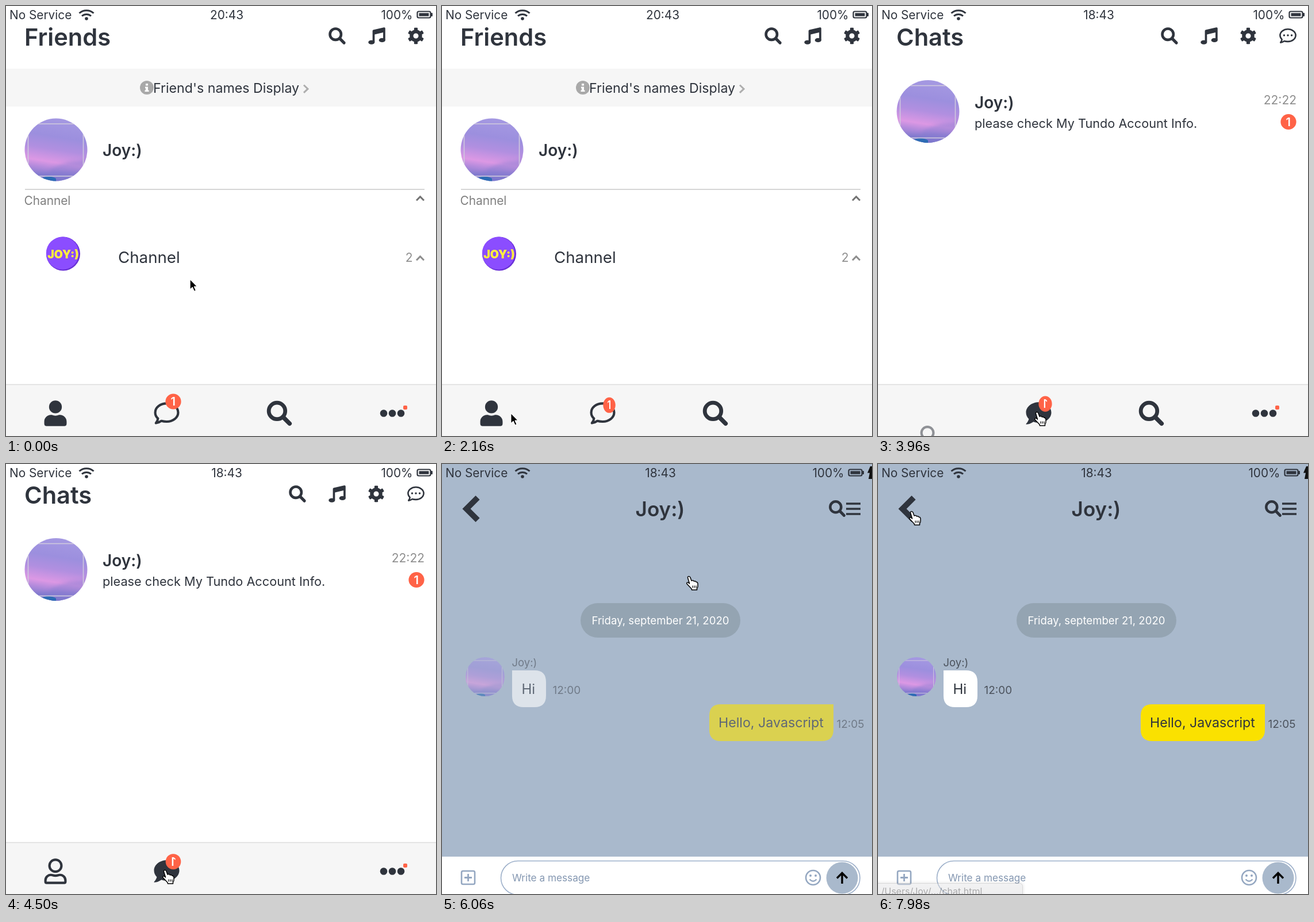
Animation, 748 px wide and 748 px high, one loop 8 s. Source, as an HTML page:

```html
<!DOCTYPE html>
<html lang="en">
<head>
<meta charset="utf-8">
<title>Messenger</title>
<style>
  html, body { margin: 0; width: 100%; height: 100%; overflow: hidden; background: #fff; }
  svg { display: block; width: 100vw; height: 100vh; font-family: Inter, "Noto Sans CJK KR", "Noto Sans CJK", sans-serif; }
  text { white-space: pre; }
</style>
</head>
<body>
<svg id="stage" viewBox="0 0 748 748"></svg>
<script>
const LOOP = 8000, INK = '#2f343d', RED = '#ff6347';
// page changes
const RELOAD = 1060, TO_CHATS = 3740, TO_ROOM = 5760;

const text = (s, x, y, size, o = {}) =>
  `<text x="${x}" y="${y}" font-size="${size}" font-weight="${o.w || 400}" fill="${o.c || INK}" text-anchor="${o.a || 'start'}">${s}</text>`;
const line = (d, c, w, extra = '') =>
  `<path d="${d}" fill="none" stroke="${c}" stroke-width="${w}" ${extra}/>`;
const icon = (id, x, y, size) =>
  `<use href="#${id}" transform="translate(${x} ${y}) scale(${size / 512}) translate(-256 -256)"/>`;
const avatar = (x, y, r) => `<use href="#avatar" transform="translate(${x} ${y}) scale(${r / 54.5})"/>`;
const ring = (d, w = 48) => line(d, INK, w, 'stroke-linejoin="round"');

const bubbleRing = 'M256 56C128 56 24 139 24 240c0 46 20 88 56 120-4 34-20 66-42 94 46-6 84-22 112-44 33 10 69 14 106 14 128 0 232-83 232-184S384 56 256 56z';
const teeth = [0, 60, 120, 180, 240, 300]
  .map(a => `<rect x="202" y="8" width="108" height="100" rx="22" transform="rotate(${a} 256 256)"/>`).join('');

const defs = `<defs>
  <linearGradient id="sky" x1=".58" y1="0" x2=".42" y2="1">
    <stop offset="0" stop-color="#a599e2"/><stop offset=".3" stop-color="#9c8fde"/>
    <stop offset=".5" stop-color="#b18fe0"/><stop offset=".7" stop-color="#dc98e4"/>
    <stop offset=".8" stop-color="#b48bdc"/><stop offset="1" stop-color="#6a74c8"/>
  </linearGradient>
  <linearGradient id="tip" x1="0" y1="0" x2="0" y2="1">
    <stop offset="0" stop-color="#e3e3e5"/><stop offset="1" stop-color="#d2d2d5"/>
  </linearGradient>
  <clipPath id="round"><circle r="54.5"/></clipPath>
  <filter id="soft" x="-20%" y="-60%" width="140%" height="220%"><feGaussianBlur stdDeviation="3"/></filter>
  <g id="avatar" clip-path="url(#round)">
    <rect x="-55" y="-55" width="110" height="110" fill="url(#sky)"/>
    <path d="M-10 34Q18 20 34 20T56 12V56H-10z" fill="#8a80d2" opacity=".5" filter="url(#soft)"/>
    <path d="M-55 46Q-10 36 20 38T56 32V56H-55z" fill="#7a76cc" opacity=".5" filter="url(#soft)"/>
    <path d="M-30 52Q-14 42 0 50V56H-30z" fill="#2d6cb4"/>
    <rect x="-48.5" y="-45" width="96" height="91" fill="none" stroke="#cfc9dd" stroke-width="1.6"/>
  </g>
  <g id="search"><circle cx="208" cy="208" r="168" fill="none" stroke="${INK}" stroke-width="80"/>
    ${line('M350 350L466 466', INK, 88, 'stroke-linecap="round"')}</g>
  <g id="music" fill="${INK}"><ellipse cx="96" cy="448" rx="96" ry="64"/><ellipse cx="416" cy="384" rx="96" ry="64"/>
    <path d="M128 448V102Q128 80 150 72L470 2Q512-8 512 32V384H448V150L192 214V448z"/></g>
  <g id="gear" fill="${INK}"><circle cx="256" cy="256" r="133" fill="none" stroke="${INK}" stroke-width="108"/>${teeth}</g>
  <path id="bubble" fill="${INK}" d="M256 32C115 32 0 125 0 240c0 50 21 95 57 131C45 421 3 466 2 467c-5 6-1 13 6 13 66 0 116-32 141-51 33 12 69 19 107 19 141 0 256-93 256-208S397 32 256 32z"/>
  <g id="bubbleLine">${ring(bubbleRing)}</g>
  <g id="bubbleDots">${ring(bubbleRing, 44)}
    <g fill="${INK}"><circle cx="144" cy="240" r="30"/><circle cx="256" cy="240" r="30"/><circle cx="368" cy="240" r="30"/></g></g>
  <g id="user" fill="${INK}" transform="translate(32)"><circle cx="224" cy="128" r="128"/>
    <path d="M0 464V422C0 348 60 288 134 288H151Q224 320 297 288H314C388 288 448 348 448 422V464Q448 512 400 512H48Q0 512 0 464z"/></g>
  <g id="userLine" transform="translate(32)"><circle cx="224" cy="144" r="120" fill="none" stroke="${INK}" stroke-width="48"/>
    ${ring('M24 464V438C24 377 73 328 134 328C160 328 176 344 224 344S288 328 314 328C375 328 424 377 424 438V464Q424 488 400 488H48Q24 488 24 464z')}</g>
</defs>`;

const statusBar = (time, mid, dx) => text('No Service', 6, 23, 20.8) +
  line('M127.5 12.5a18.5 18.5 0 0 1 25 0M132 17.5a12 12 0 0 1 16 0', INK, 3) +
  `<circle cx="140" cy="22" r="2.8" fill="${INK}"/>` +
  text(time, mid, 23, 20.8, { a: 'middle' }) +
  `<g transform="translate(${dx})">${text('100%', 707.5, 23, 20.8, { a: 'end' })}
    <rect x="715.5" y="9.5" width="23" height="11" rx="2.5" fill="none" stroke="${INK}" stroke-width="2.2"/>
    <rect x="718.5" y="12.3" width="17" height="5.4" fill="${INK}"/><rect x="739" y="12" width="3" height="6" rx="1" fill="${INK}"/></g>`;

const tools = x => icon('search', x, 52, 29.5) + icon('music', x + 69, 52, 29.5) + icon('gear', x + 137, 52, 29.5);
const caretUp = (y, c) => line(`M714 ${y + 3.3}l6.5-6.6 6.5 6.6`, c, 3);
const redOne = `<circle r="13.6" fill="${RED}"/>` + text('1', -.3, 7, 20, { w: 600, c: '#fff', a: 'middle' });

const friends = statusBar('20:43', 384, 0) + text('Friends', 32, 69, 41.6, { w: 600 }) + tools(576) +
  `<rect y="109" width="748" height="66" fill="#f6f6f6"/><circle cx="245" cy="142" r="12" fill="#a9a9a9"/>
   <path d="M243 135h4v3.5h-4zM242 140.5h5v6h1.5v2.5h-7v-2.5h1.5v-3.500h-1z" fill="#fff"/>` +
  text("Friend's names Display", 256, 151, 23.2) + line('M518 137.5l7 6.7-7 6.7', '#aeaeae', 3) +
  avatar(87, 250, 54.5) + text('Joy:)', 168, 261, 28, { w: 600 }) +
  line('M33 319H728', '#c9c9c9', 1.6) + text('Channel', 31.5, 345.5, 20.8, { c: '#7f7f7f' }) + caretUp(335, '#747474') +
  `<circle cx="99.5" cy="431" r="29.5" fill="#6930d6"/><circle cx="98.3" cy="430" r="28.5" fill="#8b4dff"/>` +
  text('JOY:)', 99.5, 439, 19.5, { w: 900, c: '#ffef3c', a: 'middle' }) +
  text('Channel', 195, 447, 27.7) + text('2', 707.5, 445, 21, { c: '#8e8e8e', a: 'end' }) + caretUp(439, '#8e8e8e');

const chats = statusBar('18:43', 384, 0) + text('Chats', 32, 69, 41.6, { w: 600 }) + tools(507) + icon('bubbleDots', 713, 52, 30) +
  avatar(87, 183.5, 54.5) + text('Joy:)', 168, 178, 28, { w: 600 }) +
  text('please check My Tundo Account Info.', 168, 212, 21.7) +
  text('22:22', 728, 171, 21, { c: '#8e8e8e', a: 'end' }) + `<g transform="translate(714 201.5)">${redOne}</g>`;

const room = `<rect width="748" height="748" fill="#a9b9cc"/>` + statusBar('18:43', 380, -8) +
  `<path d="M745 4L740 15.5H744L742 26H748V4z" fill="#111"/>` +
  line('M58.5 62L42.5 78L58.5 94', INK, 10, 'stroke-linecap="square"') +
  text('Joy:)', 379.5, 91, 35, { w: 600, a: 'middle' }) + icon('search', 687.5, 77.5, 29) +
  line('M703 69H728M703 78H728M703 87H728', INK, 3.4) +
  `<rect x="241" y="242" width="278" height="60" rx="30" fill="#94a4b2"/>` +
  text('Friday, september 21, 2020', 380, 279, 18.6, { c: '#fff', a: 'middle' }) +
  `<g id="talk">` + avatar(67, 370, 34) + text('Joy:)', 113.5, 352, 18.5, { c: '#4b525c' }) +
  `<path d="M114 359H153Q173 359 173 379V403Q173 423 153 423H134Q114 423 114 403z" fill="#fff"/>` + text('Hi', 130.5, 400, 24) +
  text('12:00', 184.5, 400, 19, { c: '#4b525c' }) +
  `<path d="M477 418H673V462Q673 482 653 482H477Q457 482 457 462V438Q457 418 477 418z" fill="#fae100"/>` +
  text('Hello, Javascript', 473, 458, 23.2) + text('12:05', 678.5, 458.5, 19, { c: '#4b525c' }) + `</g>` +
  `<rect y="683" width="748" height="65" fill="#fff"/>
   <rect x="34" y="708" width="23" height="23" rx="2.5" fill="none" stroke="#94a7c1" stroke-width="2.6"/>` +
  line('M39 719.5H52M45.5 713V726', '#94a7c1', 2.8) +
  `<rect x="102.5" y="690.5" width="624.5" height="59" rx="29.5" fill="#fff" stroke="#9cafc9" stroke-width="1.6"/>` +
  text('Write a message', 122, 726, 17.2, { c: '#8497b1' }) +
  `<circle cx="645.5" cy="719.5" r="12.5" fill="none" stroke="#94a7c1" stroke-width="2.6"/>
   <circle cx="641" cy="716" r="2" fill="#94a7c1"/><circle cx="650" cy="716" r="2" fill="#94a7c1"/>` +
  line('M639.5 722.5q6 6.5 12 0', '#94a7c1', 2.4) +
  `<circle cx="696" cy="720" r="27.5" fill="#a9b9cc"/>` + line('M696 730V712M687 720.5l9-9 9 9', '#000', 3.4);

const nav = `<rect y="658" width="748" height="90" fill="#f6f6f6"/>` + line('M0 658.5H748', '#dcdcdc', 1.4) +
  `<g class="link"><g id="me">${icon('user', 86, 708.5, 44.5)}</g><g id="meOff">${icon('userLine', 86, 708.5, 44.5)}</g></g>
   <g class="link"><g id="talkOff">${icon('bubbleLine', 279.5, 708.5, 44)}</g><g id="talkOn">${icon('bubble', 279.5, 708.5, 44)}</g>
     <g id="badge">${redOne}</g></g>
   <g class="link">${icon('search', 475.5, 708.5, 43.5)}</g>
   <g class="link" fill="${INK}"><circle cx="657" cy="708.5" r="6.3"/><circle cx="672" cy="708.5" r="6.3"/><circle cx="687" cy="708.5" r="6.3"/>
     <rect x="691" y="695" width="7" height="7" rx="2" fill="${RED}"/></g>`;

const overlay = `<g id="hint"><rect x="-8" y="729" width="260" height="40" rx="5" fill="#000" opacity=".25" filter="url(#soft)"/>
    <rect x="-8" y="729.5" width="259.5" height="40" rx="5" fill="url(#tip)" stroke="#a9a9ab"/>
    <text id="hintText" x="5.5" y="749" font-size="16" fill="#47474a"></text></g>
  <g id="cursor" stroke-linejoin="round">
    <path id="arrow" d="M0 0V18.5L4.3 14.5L7.3 21.5L10.5 20L7.5 13.3H13z" fill="#000" stroke="#fff" stroke-width="1.4"/>
    <g id="hand" stroke="#000" stroke-width="1.5">
      <path d="M-3.5 1Q-4-1.5-1.5-1.5Q.3-1.5 1 .5L3 6Q6 4.5 7.2 7Q10 6 11 8.2Q13.5 8 14 11L14 15Q14 18 12.5 19V22H3.5L3 20L-5 11.5Q-6 8.5-3 9L-.5 11z" fill="#fff"/>
      <path d="M5 14.5V18.5M8 14.5V18.5M11 14.5V18.5" fill="none" stroke-width="1.2"/></g></g>`;

document.getElementById('stage').innerHTML = defs + `<rect width="748" height="748" fill="#fff"/>
  <g id="friends">${friends}</g><g id="chats">${chats}</g><g id="nav">${nav}</g><g id="room">${room}</g>${overlay}`;

const $ = id => document.getElementById(id);
const links = [...document.querySelectorAll('.link')];
const show = (id, on) => $(id).setAttribute('display', on ? 'inline' : 'none');
const clamp = v => Math.min(1, Math.max(0, v));
const smooth = p => p * p * (3 - 2 * p);

// [time, x, y] of the pointer's hot spot
const path = [[0, 320, 475], [200, 320, 475], [780, 91, 708], [2000, 91, 708], [2650, 278, 708],
  [4900, 278, 708], [5450, 431, 197], [6800, 431, 197], [7850, 60, 84], [8000, 60, 84]];
const hints = [[720, 1060, '/Users/Joy/.../index.html'], [1060, 1950, 'ka-f.fontawesome.com의 응답...'],
  [2580, 3740, '/Users/Joy/.../chat.html'], [5380, 5760, '/Users/Joy/.../chats.html'], [7900, 8400, '/Users/Joy/.../chat.html']];

function pointer(t) {
  const i = Math.max(1, path.findIndex(p => p[0] > t));
  const [t0, x0, y0] = path[i - 1], [t1, x1, y1] = path[i];
  const p = smooth((t - t0) / (t1 - t0));
  return [x0 + (x1 - x0) * p, y0 + (y1 - y0) * p];
}

function draw(t) {
  const page = t < TO_CHATS ? 'friends' : t < TO_ROOM ? 'chats' : 'room';
  for (const id of ['friends', 'chats', 'room']) show(id, id === page);
  show('nav', page !== 'room');
  for (const id of ['me', 'talkOff']) show(id, page === 'friends');
  for (const id of ['meOff', 'talkOn']) show(id, page === 'chats');

  // each tab fades up in turn after a page load
  const load = t < RELOAD ? -3000 : t < TO_CHATS ? RELOAD : TO_CHATS;
  links.forEach((el, i) => {
    const age = t - load - i * 330, p = age < 0 ? 1 : clamp(age / 430);
    el.setAttribute('transform', `translate(0 ${90 * (1 - p)})`);
    el.setAttribute('opacity', p);
  });

  // badge: up with a full turn, then back
  const start = t < RELOAD ? -500 : load;
  const phase = ((t - start) % 1000) / 500;
  const up = smooth(phase < 1 ? phase : 2 - phase);
  $('badge').setAttribute('transform', `translate(291 ${695 - 7 * up}) scale(${Math.cos(2 * Math.PI * up)} 1)`);

  const talk = clamp((t - TO_ROOM) / 500);
  $('talk').setAttribute('transform', `translate(${20 * (1 - talk)})`);
  $('talk').setAttribute('opacity', talk);

  const hint = hints.find(h => t >= h[0] && t < h[1]);
  show('hint', hint);
  if (hint) {
    $('hintText').textContent = hint[2];
    $('hint').setAttribute('opacity', hint[0] === RELOAD ? 1 : clamp((t - hint[0]) / 180) * clamp((hint[1] - t) / 60 + .2));
  }

  const [x, y] = pointer(t);
  const onTab = y > 680 && (Math.abs(x - 86) < 24 || Math.abs(x - 279) < 26);
  const over = page === 'room' ? t < 6800 || (x < 66 && y < 100) : onTab || (page === 'chats' && y < 240);
  $('cursor').setAttribute('transform', `translate(${x} ${y})`);
  show('hand', over);
  show('arrow', !over);
}

const begin = performance.now();
function tick() {
  draw((performance.now() - begin) % LOOP);
  requestAnimationFrame(tick);
}
tick();
</script>
</body>
</html>
```
